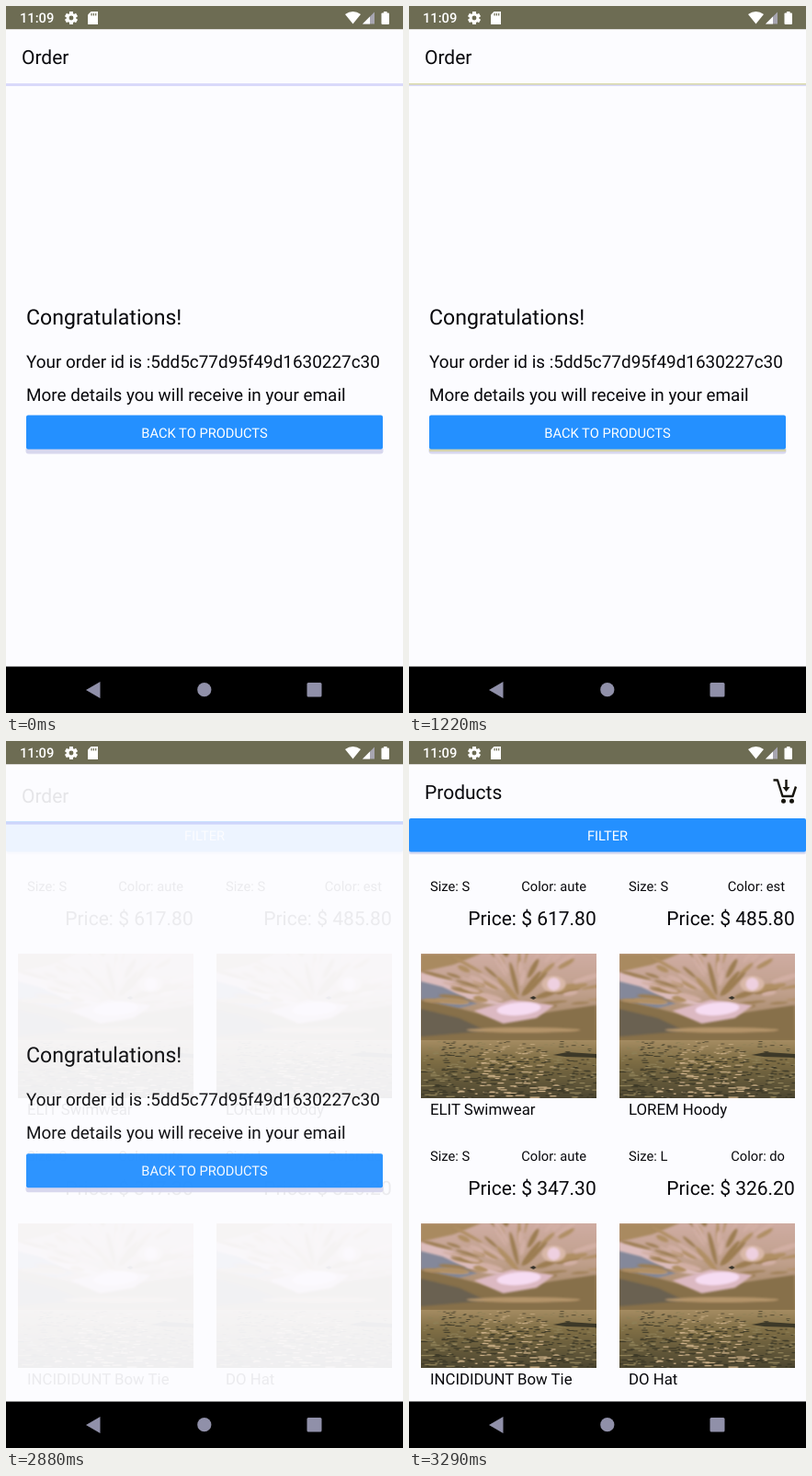
An HTML page with a canvas that plays this animation: 432 by 768 pixels, repeating every 3.31 s.

```html
<!DOCTYPE html>
<html lang="en">
<head>
<meta charset="utf-8">
<title>Order</title>
<style>
html, body { margin: 0; width: 100%; height: 100%; overflow: hidden; background: #fcfcff; }
canvas { display: block; width: 432px; height: 768px; }
</style>
</head>
<body>
<canvas id="stage" width="432" height="768"></canvas>
<script>
const ctx = document.getElementById('stage').getContext('2d');
const LOOP = 3310, SLIDE_START = 2621, SLIDE_TIME = 504, SLIDE_BY = 52;
const PAPER = '#fcfcff', INK = '#08080c', BLUE = '#2490ff', ICON = '#9090a9';
const TOP = 25.2, HEADER_END = 84, BOTTOM = 717.6;

const clamp = v => Math.max(0, Math.min(1, v));

function rect(x, y, w, h, color, g = ctx) {
  g.fillStyle = color;
  g.fillRect(x, y, w, h);
}

function rounded(x, y, w, h, r, color) {
  ctx.fillStyle = color;
  ctx.beginPath();
  ctx.roundRect(x, y, w, h, r);
  ctx.fill();
}

function poly(points, color, g = ctx) {
  g.fillStyle = color;
  g.beginPath();
  points.forEach(([x, y]) => g.lineTo(x, y));
  g.fill();
}

function ellipse(x, y, rx, ry, color, g = ctx, tilt = 0) {
  g.fillStyle = color;
  g.beginPath();
  g.ellipse(x, y, rx, ry, tilt, 0, 7);
  g.fill();
}

function text(str, x, y, size, color = INK, align = 'left', weight = 400) {
  ctx.font = `${weight} ${size}px Roboto, sans-serif`;
  ctx.textRendering = 'geometricPrecision';
  ctx.textAlign = align;
  ctx.fillStyle = color;
  ctx.fillText(str, x, y);
}

function makePhoto() {
  const photo = document.createElement('canvas');
  photo.width = 191;
  photo.height = 157;
  const g = photo.getContext('2d');
  let seed = 11;
  const rnd = () => (seed = seed * 16807 % 2147483647) / 2147483647;

  const sky = g.createLinearGradient(0, 0, 0, 94);
  sky.addColorStop(0, '#cfaca2');
  sky.addColorStop(.45, '#c0a08c');
  sky.addColorStop(1, '#94794e');
  rect(0, 0, 191, 157, sky, g);

  g.filter = 'blur(1px)';
  poly([[0, 0], [66, 0], [36, 12], [0, 20]], '#a98a60', g);
  poly([[0, 26], [26, 34], [62, 54], [40, 60], [0, 50]], '#84889a', g);
  poly([[0, 20], [34, 30], [72, 46], [96, 58], [58, 52], [24, 36], [0, 30]], '#dcbcbc', g);
  poly([[0, 50], [44, 60], [88, 72], [150, 62], [191, 56], [191, 94], [0, 94]], '#87704a', g);
  poly([[0, 60], [42, 70], [72, 84], [0, 90]], '#6a6151', g);

  // Cloud streaks fan out from the bright patch above the horizon.
  for (let i = 0; i < 60; i++) {
    const angle = -.15 - rnd() * 2.85, far = 34 + rnd() * 75;
    const x = 107 + Math.cos(angle) * far, y = 60 + Math.sin(angle) * far * .62;
    const color = ['#9c7d52', '#b08f64', '#d2afa4'][i % 3];
    ellipse(x, y, 6 + rnd() * 13, 1 + rnd() * 2.5, color, g, Math.atan(Math.tan(angle) * .4));
  }
  ellipse(145, 33, 13, 9, '#d9b8a8', g);
  ellipse(145, 33, 7, 7, '#eed0e0', g);
  poly([[58, 62], [100, 50], [146, 56], [126, 70], [90, 76]], '#dcb9c2', g);
  ellipse(107, 60, 24, 7, '#f6dcf2', g, -.08);
  ellipse(112, 83, 62, 3, '#b4946a', g);
  g.filter = 'none';

  const sea = g.createLinearGradient(0, 94, 0, 157);
  sea.addColorStop(0, '#a58c62');
  sea.addColorStop(.35, '#7f6e45');
  sea.addColorStop(1, '#4c4630');
  rect(0, 94, 191, 63, sea, g);
  for (let i = 0; i < 560; i++) {
    const depth = rnd(), x = rnd() * 191, y = 95 + depth * 61;
    const glint = Math.abs(x - 98) < 24 + depth * 42;
    const color = rnd() < .5 ? '#3e3a28' : glint ? '#ccb088' : '#8e8058';
    rect(x, y, 2 + rnd() * (3 + depth * 6), .7 + depth * .7, color, g);
  }
  poly([[144, 110], [160, 107], [191, 109], [191, 113], [158, 112]], '#3c3828', g);
  poly([[119, 48], [123, 46], [126, 48], [123, 50]], '#343028', g);
  return photo;
}
const photo = makePhoto();

function gear(x, y) {
  ctx.save();
  ctx.translate(x, y);
  for (let i = 0; i < 6; i++) {
    rect(-2, -7, 4, 4, '#fff');
    ctx.rotate(Math.PI / 3);
  }
  ctx.strokeStyle = '#fff';
  ctx.lineWidth = 2.9;
  ctx.beginPath();
  ctx.arc(0, 0, 3.9, 0, 7);
  ctx.stroke();
  ctx.restore();
}

function systemBars() {
  rect(0, 0, 432, TOP, '#6d6c53');
  text('11:09', 15, 18, 14.7, '#fff', 'left', 500);
  gear(71, 13);
  poly([[92.5, 6], [100, 6], [100, 20], [89, 20], [89, 9.5]], '#fff');
  for (let i = 0; i < 3; i++) rect(92.5 + i * 2.3, 8, 1.2, 2.5, '#6d6c53');
  ctx.fillStyle = '#fff';
  ctx.beginPath();
  ctx.moveTo(377.5, 19.5);
  ctx.lineTo(369, 9);
  ctx.quadraticCurveTo(377.5, 3, 386, 9);
  ctx.fill();
  poly([[388, 19.5], [401, 6.5], [401, 19.5]], '#a7a5b0');
  poly([[388, 19.5], [396, 11.5], [396, 19.5]], '#fff');
  rounded(408.5, 7.5, 8.5, 12.5, 1, '#fff');
  rect(411, 6, 3.5, 2, '#fff');

  rect(0, BOTTOM, 432, 768 - BOTTOM, '#000');
  poly([[87, 743], [102.5, 734], [102.5, 752]], ICON);
  ellipse(215.8, 742.7, 7.6, 7.6, ICON);
  rounded(327.5, 735, 16, 15.5, 1.5, ICON);
}

function cart() {
  ctx.strokeStyle = '#17150f';
  ctx.lineWidth = 2.4;
  ctx.lineJoin = 'round';
  ctx.beginPath();
  [[396.5, 42.5], [401, 42.5], [406.5, 60], [417.5, 60], [421, 49.5]]
    .forEach(([x, y]) => ctx.lineTo(x, y));
  ctx.moveTo(410.5, 42);
  ctx.lineTo(410.5, 51);
  ctx.stroke();
  poly([[406.5, 50], [414.5, 50], [410.5, 55]], '#17150f');
  ellipse(407.5, 65.3, 2.5, 2.5, '#17150f');
  ellipse(416.5, 65.3, 2.5, 2.5, '#17150f');
}

const details = [
  ['S', 'aute', '617.80'], ['S', 'est', '485.80'],
  ['S', 'aute', '347.30'], ['L', 'do', '326.20']
];
const names = ['ELIT Swimwear', 'LOREM Hoody', 'INCIDIDUNT Bow Tie', 'DO Hat'];

function productsScreen() {
  rect(0, TOP, 432, BOTTOM - TOP, PAPER);
  text('Products', 17, 63, 21);
  cart();
  rounded(0, 86, 432, 37, 2, '#d9dcf2');
  rounded(0, HEADER_END, 432, 36.5, 2, BLUE);
  text('FILTER', 216, 108, 14.7, '#fff', 'center');
  details.forEach(([size, color, price], i) => {
    const x = i % 2 * 216, y = (i >> 1) * 293;
    text('Size: ' + size, x + 23, y + 163, 14.7);
    text('Color: ' + color, x + 193, y + 163, 14.7, INK, 'right');
    text('Price: $ ' + price, x + 203.7, y + 200, 21, INK, 'right');
    ctx.drawImage(photo, x + 12.5, y + 231);
    text(names[i], x + 23, y + 406, 16.8);
  });
}

function orderScreen(time) {
  const q = clamp((time - SLIDE_START) / SLIDE_TIME) ** 4;
  if (q === 1) return;
  const cover = 1 - q;
  const warmShadow = time > 300 && time < SLIDE_START + 100;
  ctx.save();
  ctx.beginPath();
  ctx.rect(0, TOP, 432, BOTTOM - TOP);
  ctx.clip();
  ctx.translate(0, SLIDE_BY * q);

  ctx.globalAlpha = cover;
  rect(0, HEADER_END, 432, BOTTOM - HEADER_END, PAPER);
  rect(0, HEADER_END, 432, 3, 'rgba(0, 0, 220, .14)');
  if (warmShadow) rect(0, HEADER_END, 432, 1.5, '#d9d9a8');

  ctx.globalAlpha = 1 - q ** 2.5;
  rect(0, TOP, 432, HEADER_END - TOP, PAPER);

  ctx.globalAlpha = cover ** .6;
  text('Congratulations!', 22, 345.5, 23.1);
  text('Your order id is :5dd5c77d95f49d1630227c30', 22, 392.5, 18.9);
  text('More details you will receive in your email', 22, 428.5, 18.9);
  rounded(21.5, 481, 389, 5.5, [0, 0, 3, 3], '#d8d7ee');
  if (warmShadow) rect(22, 481, 388, 3, '#d5d3ae');
  rounded(22, 444.5, 388, 37, 2, BLUE);
  text('BACK TO PRODUCTS', 216, 468.5, 14.7, '#fff', 'center');

  ctx.globalAlpha = 1 - clamp((time - 2700) / 200);
  text('Order', 17, 63, 21);
  ctx.restore();
}

function draw(now) {
  const time = now % LOOP;
  productsScreen();
  orderScreen(time);
  systemBars();
}

function tick() {
  draw(performance.now() - start);
  requestAnimationFrame(tick);
}
const start = performance.now();
tick();
</script>
</body>
</html>
```
